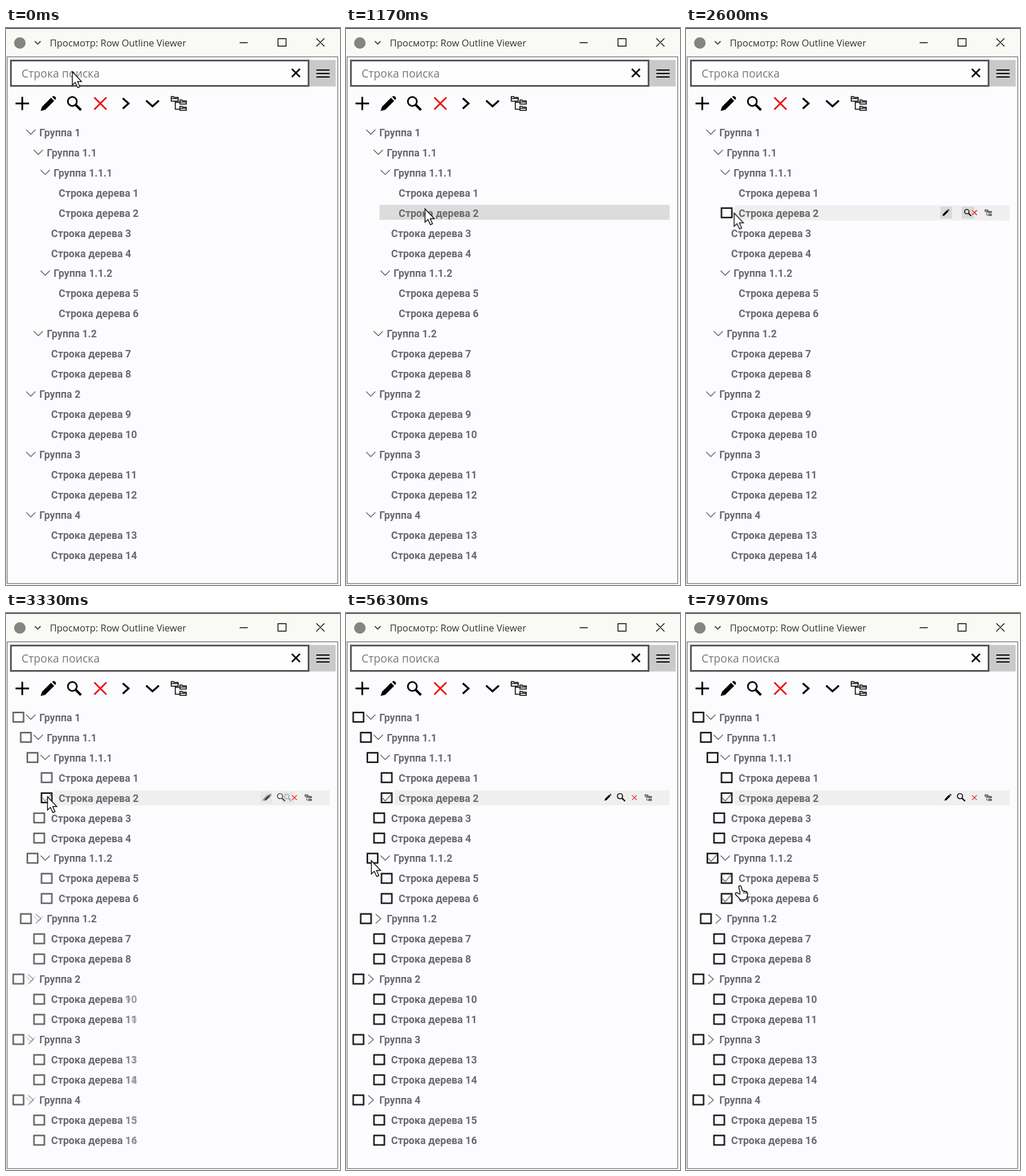
These frames come from a looping animation (579x967 px, 8000 ms). An HTML page:

```html
<!DOCTYPE html>
<html lang="ru">
<head>
<meta charset="utf-8">
<title>Дерево</title>
<style>
  html, body { margin: 0; width: 100%; height: 100%; overflow: hidden; background: #fcfcfe; }
  svg { display: block; width: 579px; height: 967px; }
  .line { fill: none; stroke: #000; }
  .thin { fill: none; stroke: #555; stroke-width: 1.3; }
  .box { fill: #fcfcfe; stroke: #0a0a0a; stroke-width: 2.5; }
  .tree { font: 700 17.7px Roboto, sans-serif; fill: #6a6a6f; }
  .ghost { fill: none; }
  .ghost tspan { fill: #6a6a6f; }
  .title { font: 16.4px "Open Sans", sans-serif; fill: #333; }
  .search { font: 19.2px "Open Sans", sans-serif; fill: #777; }
</style>
</head>
<body>
<svg id="stage" viewBox="0 0 579 967">
  <defs>
    <path id="pencil" d="M-13.5 13L-11 5.500L4.500-10L10-4.500L-5.500 11ZM6.500-11.500L8.500-13Q10-13.500 12-11.500T13-8L11.500-6Z"/>
    <g id="lens" class="line">
      <circle cx="-3.500" cy="-3.500" r="7.800" stroke-width="2.800"/>
      <path d="M2.500 2.500L11.500 11.500" stroke-width="4"/>
    </g>
    <path id="cross" d="M-10.500-10.500L10.500 10.500M10.500-10.500L-10.500 10.500" fill="none" stroke="#f01010" stroke-width="2.900"/>
    <path id="folders" class="line" stroke-width="1.600"
      d="M-13-12H-9L-8-10.500H-1V-4H-13ZM-13-8.500H-1M-6-4V10H1M-6-2H1M2-6H6L7-4.500H13V1H2ZM2-2.500H13M2 5H6L7 6.500H13V12H2ZM2 8.500H13"/>
    <path id="down" class="thin" d="M-8-4.500L0 3.500L8-4.500"/>
    <path id="right" class="thin" d="M-4.500-8L4.500 0L-4.500 8"/>
    <path id="tick" class="thin" d="M-7.500 0L-2.500 5.500L8-6.500"/>
    <rect id="check" class="box" x="-9" y="-8.300" width="18" height="16.400"/>
  </defs>

  <rect width="579" height="50" fill="#f9f9f6"/>
  <rect width="579" height="1.300" fill="#202028"/>
  <rect x="2" y="50" width="573" height="914.500" fill="#fcfcfe" stroke="#707070" stroke-width="1.300"/>
  <circle cx="24" cy="26" r="10" fill="#85857f"/>
  <path class="line" d="M50 23L55 28L60 23" stroke-width="1.800" style="stroke:#444"/>
  <text class="title" x="76" y="32">Просмотр: Row Outline Viewer</text>
  <path class="line" d="M405 25.500H419M471.500 18.500H485.500V31.500H471.500ZM538 18L552 32M552 18L538 32" stroke-width="1.400"/>

  <rect x="526" y="55.500" width="45.500" height="46" fill="#c9c9c9"/>
  <path class="line" d="M538 73H561M538 79H561M538 85H561" stroke-width="2"/>
  <rect x="8.500" y="56.500" width="516" height="44" fill="#fefefe" stroke="#58565a" stroke-width="3"/>
  <text class="search" x="27" y="86">Строка поиска</text>
  <path class="line" d="M495.500 71L509.500 85M509.500 71L495.500 85" stroke-width="2.800"/>

  <path class="line" d="M16.500 131H40M28.200 119.500V142.500" stroke-width="3"/>
  <use href="#pencil" x="73.500" y="131"/>
  <use href="#lens" x="118.500" y="131"/>
  <use href="#cross" x="163.500" y="131"/>
  <path class="line" d="M202.500 122L212.500 131L202.500 140M243 126L254 136L265 126" stroke-width="3.300"/>
  <use href="#folders" x="299.500" y="131"/>

  <rect x="58" y="307" width="503" height="26" fill="#dcdcdc" data-in="840" data-out="1600"/>
  <g data-in="1600">
    <rect x="84" y="308" width="477" height="26" fill="#efefef"/>
    <use href="#cross" transform="translate(500 320.500) scale(.4)"/>
    <use href="#folders" transform="translate(524 320.500) scale(.44)"/>
  </g>
  <g data-in="1600" data-out="3130">
    <path d="M441 310H461V331H441ZM478 310H500V331H478Z" fill="#d9d9d9"/>
    <use href="#pencil" transform="translate(450.500 320.500) scale(.45)"/>
    <use href="#lens" transform="translate(488.500 320.500) scale(.5)"/>
    <use href="#cross" transform="translate(500 320.500) scale(.4)"/>
  </g>
  <g data-in="3130">
    <use href="#pencil" transform="translate(454 320) scale(.45)"/>
    <use href="#lens" transform="translate(477 320) scale(.58)"/>
  </g>

  <g id="rows"></g>

  <g id="cursor">
    <path id="arrow" d="M0 0V23L5 18.500L9.300 27.500L13 25.800L9 17H16Z" fill="#fff" stroke="#111" stroke-width="1.500"/>
    <path id="hand" d="M9 14L6.500 3Q6.500 .5 8.500 .5T11 3L12.500 9L19 10.500Q22 11.500 22 15L21 20Q20 25 17 25H11Q8 25 7 22L1 16Q-.5 13 2.500 12.500Q5 12.500 9 16M15.500 10V14M19 11V14.500"
      fill="#fff" stroke="#111" stroke-width="1.600"/>
  </g>
</svg>

<script>
const LOOP = 8000, FADE = 300, PITCH = 34.97;
const HOVER = 1600, EXPAND = 3130, SELECT = 5600;

// Kinds: 0-2 group depth, "a" shallow leaf, "b" deep leaf
const kinds = {
  0: { text: 57.8, check: 21.5, chevron: 43 },
  1: { text: 70.8, check: 34.5, chevron: 56 },
  2: { text: 82.5, check: 46, chevron: 68 },
  a: { text: 78.3, check: 57.5 },
  b: { text: 91.3, check: 70.5 }
};
const rows = [
  [0, "1"], [1, "1.1"], [2, "1.1.1"], ["b", 1], ["b", 2], ["a", 3], ["a", 4],
  [2, "1.1.2"], ["b", 5], ["b", 6], [1, "1.2"], ["a", 7], ["a", 8],
  [0, "2"], ["a", 9, 10], ["a", 10, 11], [0, "3"], ["a", 11, 13], ["a", 12, 14],
  [0, "4"], ["a", 13, 15], ["a", 14, 16]
];
const hovered = 4, firstFolded = 10;
const tickTimes = { 4: EXPAND, 7: SELECT, 8: SELECT, 9: SELECT };

const fadeIn = ms => `data-in="${ms}"`;
const fadeOut = ms => `data-out="${ms}"`;
const use = (id, x, y, fade = "") => `<use href="#${id}" x="${x}" y="${y}" ${fade}/>`;

function rowMarkup([kind, number, later], i) {
  const { text, check, chevron } = kinds[kind];
  const y = 181 + PITCH * i;
  const word = chevron ? "Группа" : "Строка дерева";
  const label = (n, cls = "", fade = "") =>
    `<text class="tree ${cls}" x="${text}" y="${y + 6.7}" ${fade}>${word} <tspan>${n}</tspan></text>`;

  // A changing number fades over a label that stays
  let out = later
    ? label("") + label(number, "ghost", fadeOut(EXPAND)) + label(later, "ghost", fadeIn(EXPAND))
    : label(number);

  out += use("check", check, y, fadeIn(i === hovered ? HOVER : EXPAND));
  if (tickTimes[i]) out += use("tick", check, y, fadeIn(tickTimes[i]));
  if (chevron) {
    const folds = i >= firstFolded;
    out += use("down", chevron, y, folds ? fadeOut(EXPAND) : "");
    if (folds) out += use("right", chevron, y, fadeIn(EXPAND));
  }
  return out;
}
document.getElementById("rows").innerHTML = rows.map(rowMarkup).join("");

// steps: [ms, value]; first and last values hold to the ends of the loop
function play(el, prop, steps) {
  const all = [[0, steps[0][1]], ...steps, [LOOP, steps[steps.length - 1][1]]];
  const frames = all.map(([ms, value]) => ({ offset: ms / LOOP, [prop]: value }));
  el.animate(frames, { duration: LOOP, iterations: Infinity });
}

document.querySelectorAll("[data-in], [data-out]").forEach(el => {
  const { in: from, out: to } = el.dataset;
  const steps = [];
  if (from) steps.push([+from, 0], [+from + FADE, 1]);
  if (to) steps.push([+to, 1], [+to + FADE, 0]);
  play(el, "opacity", steps);
});

const path = [
  [30, 115, 76], [230, 117, 110], [530, 127, 215], [830, 135, 297], [1070, 137, 314],
  [1630, 137, 314], [1970, 134, 315], [2430, 112, 327], [2670, 72, 319],
  [3530, 72, 319], [4030, 62, 332], [4530, 43, 376], [4830, 54, 432], [5030, 44, 430],
  [6470, 44, 430], [6870, 38, 455], [7270, 36, 494], [7460, 18, 632],
  [7700, 34, 325], [7850, 70, 420], [7960, 85, 473]
];
play(document.getElementById("cursor"), "transform",
  path.map(([ms, x, y]) => [ms, `translate(${x}px, ${y}px)`]));
play(document.getElementById("arrow"), "opacity", [[7850, 1], [7850, 0]]);
play(document.getElementById("hand"), "opacity", [[7850, 0], [7850, 1]]);
</script>
</body>
</html>
```
